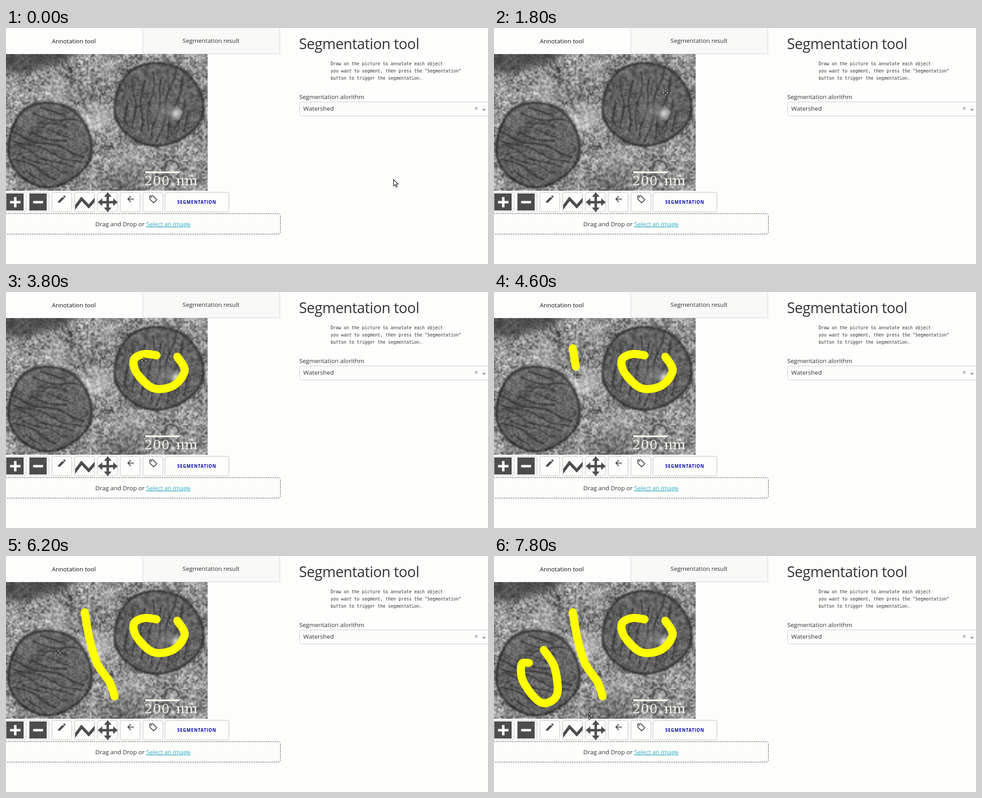
Animation of 1066 by 525 pixels, one loop 8000 ms. Source, as an HTML page with a canvas:

```html
<!DOCTYPE html>
<html lang="en">
<head>
<meta charset="utf-8">
<title>Segmentation tool</title>
<style>
html, body { margin: 0; width: 100%; height: 100%; overflow: hidden; background: #fdfdfb; }
canvas, svg { position: absolute; left: 0; top: 0; }
canvas { top: 58px; }
text { font: 13.4px "Open Sans", sans-serif; fill: #333; }
.mid { text-anchor: middle; }
.title { font-size: 32px; letter-spacing: -.5px; }
.mono text { font: 9.6px "DejaVu Sans Mono", monospace; }
.scale text { font: 30px "DejaVu Serif", serif; fill: #f4f4ea; }
.scale .digits { font-size: 28px; letter-spacing: 1px; }
.action { font-size: 9.8px; font-weight: 700; letter-spacing: .85px; fill: #0000c4; }
.link { fill: #2aa9c4; text-decoration: underline; }
.box { fill: none; stroke: #bbb; }
.icon { fill: #4d4d4d; }
.line { fill: none; stroke: #4d4d4d; stroke-width: 1.8; }
.ink { fill: none; stroke: #ff0; stroke-width: 18; stroke-linecap: round; stroke-linejoin: round; }
</style>
</head>
<body>
<canvas id="photo" width="446" height="304"></canvas>
<svg width="1066" height="525" viewBox="0 0 1066 525">
  <path d="M302 0H605.5V57.5H302Z" fill="#f8f8f7"/>
  <path d="M302.5 0V57.5H605.5V0" fill="none" stroke="#d3d3d3"/>
  <text class="mid" x="150" y="34" style="fill:#111">Annotation tool</text>
  <text class="mid" x="453.5" y="33">Segmentation result</text>

  <text class="title" x="648" y="47">Segmentation tool</text>
  <g class="mono">
    <text x="718" y="83">Draw on the picture to annotate each object</text>
    <text x="718" y="99">you want to segment, then press the "Segmentation"</text>
    <text x="718" y="115">button to trigger the segmentation.</text>
  </g>
  <text x="648.5" y="158">Segmentation alorithm</text>
  <rect x="649.5" y="164.5" width="430" height="31" rx="4" fill="none" stroke="#c6c6d8"/>
  <text x="657.5" y="184">Watershed</text>
  <path d="M1037 176l6 6m0-6l-6 6" stroke="#999" stroke-width="1.3"/>
  <path d="M1052.5 180h9l-4.5 4.5z" fill="#999"/>

  <g class="scale">
    <path d="M308 321H384" stroke="#f4f4ea" stroke-width="4"/>
    <text class="digits" x="306" y="350">200</text>
    <text x="376" y="350">nm</text>
  </g>

  <g id="buttons"></g>
  <rect class="box" x="351.5" y="365.5" width="141.5" height="43.5" rx="4"/>
  <text class="mid action" x="422" y="391">SEGMENTATION</text>
  <path class="icon" d="M1 368h38v38H1zM52 368h38v38H52z"/>
  <path d="M9 387.5h23M20.5 376v23M60 387.5h22" stroke="#fdfdfb" stroke-width="5.5"/>
  <path class="icon" transform="translate(112.5 369.8) scale(.92)" d="M3 17.2V21h3.8L17.8 9.9 14.1 6.2zM20.7 7c.4-.4.4-1 0-1.4l-2.3-2.3c-.4-.4-1-.4-1.4 0l-1.9 1.8 3.8 3.8z"/>
  <svg x="153" y="366" width="43" height="43"><path class="line" style="stroke-width:6.5" d="M-3 37L14 14 30 31 46 13"/></svg>
  <path class="line" style="stroke-width:5.5" d="M209 387.5H241M225 372V403"/>
  <g id="heads" class="icon"></g>
  <path class="line" d="M283 380.5H270M276 374l-6.5 6.5 6.5 6.5"/>
  <path class="line" stroke-linejoin="round" d="M318 373.5v7l8.5 8.5 7-7-8.5-8.5z"/>
  <circle class="icon" cx="321.3" cy="376.8" r="1.5"/>

  <rect x="-10.5" y="413" width="617.5" height="45.5" rx="5" fill="none" stroke="#333" stroke-dasharray="3 2"/>
  <text class="mid" x="302.7" y="441">Drag and Drop or <tspan class="link">Select an Image</tspan></text>

  <g id="strokes"></g>
  <path id="arrow" d="M0 0V14.5L3.4 11.4 5.8 17 8.2 16 5.8 10.5H10.3Z" fill="#fff" stroke="#111" stroke-width="1.2"/>
  <g id="cross">
    <path d="M-8 0H-1M1 0H8M0 -8V-1M0 1V8" stroke="#111" stroke-width="3.4"/>
    <path d="M-7 0H-2M2 0H7M0 -7V-2M0 2V7" stroke="#fff" stroke-width="1.3"/>
  </g>
</svg>
<script>
const $ = id => document.getElementById(id);
const LOOP = 8000, STEP = 200, LAG = 94;

// Catmull-Rom curve through a few key points
function curve(p) {
  const at = i => p[Math.max(0, Math.min(p.length - 1, i))];
  const handle = (i, sign) => [0, 1].map(k => at(i)[k] + sign * (at(i + 1)[k] - at(i - 1)[k]) / 6);
  return 'M' + p[0] + p.slice(1).map((q, i) => `C${handle(i, 1)} ${handle(i + 1, -1)} ${q}`).join('');
}

function svgNode(parent, tag, attrs) {
  const node = document.createElementNS('http://www.w3.org/2000/svg', tag);
  for (const k in attrs) node.setAttribute(k, attrs[k]);
  return parent.appendChild(node);
}

for (let i = 0; i < 7; i++)
  svgNode($('buttons'), 'rect', { class: 'box', x: 0.5 + i * 50.4, y: 365.5, width: 44, height: 43.5, rx: 4 });
for (let turn = 0; turn < 360; turn += 90)
  svgNode($('heads'), 'path', { d: 'M22 0L12 8.5V-8.5Z', transform: `translate(225 387.5) rotate(${turn})` });

// Grey mottled picture with two dark round bodies
function drawPhoto() {
  const c = $('photo').getContext('2d');
  let seed = 7;
  const rand = () => (seed = (seed * 16807) % 2147483647) / 2147483647;

  function mottle(size, low, high, alpha) {
    const tile = document.createElement('canvas');
    tile.width = Math.ceil(446 / size) + 1;
    tile.height = Math.ceil(304 / size) + 1;
    const t = tile.getContext('2d');
    for (let y = 0; y < tile.height; y++)
      for (let x = 0; x < tile.width; x++) {
        const v = Math.round(low + rand() * (high - low));
        t.fillStyle = `rgb(${v},${v},${v})`;
        t.fillRect(x, y, 1, 1);
      }
    c.globalAlpha = alpha;
    c.drawImage(tile, 0, 0, tile.width * size, tile.height * size);
    c.globalAlpha = 1;
  }
  function glow(x, y, r, grey, alpha) {
    const g = c.createRadialGradient(x, y, 0, x, y, r);
    g.addColorStop(0, `rgba(${grey},${grey},${grey},${alpha})`);
    g.addColorStop(1, `rgba(${grey},${grey},${grey},0)`);
    c.fillStyle = g;
    c.fillRect(x - r, y - r, 2 * r, 2 * r);
  }
  function line(path, width, alpha) {
    c.lineWidth = width;
    c.strokeStyle = `rgba(30,30,30,${alpha})`;
    c.stroke(path);
  }

  // Wobbly ellipse with wavy folds that fan out around the given angle
  function body(cx, cy, rx, ry, angle, fan, folds) {
    const outline = new Path2D();
    for (let a = 0; a < 2 * Math.PI; a += 0.05) {
      const r = 1 + 0.02 * Math.sin(3 * a + 1) + 0.012 * Math.sin(5 * a);
      outline.lineTo(cx + rx * r * Math.cos(a), cy + ry * r * Math.sin(a));
    }
    outline.closePath();
    c.fillStyle = 'rgba(72,72,72,.58)';
    c.fill(outline);
    line(outline, 9, .25);
    line(outline, 3.5, .55);

    for (let k = 0; k < folds; k++) {
      const side = (k + .5) / folds * 2 - 1;
      const a = angle + fan * side;
      const half = Math.sqrt(1 - side * side) * rx * (.45 + .45 * rand());
      const shift = (rand() - .5) * rx * .3;
      const fold = new Path2D();
      for (let s = -half; s <= half; s += 3) {
        const along = s + shift * (1 - half / rx);
        const across = side * ry * .88 + 4 * Math.sin(s / 17 + k * 2);
        fold.lineTo(cx + along * Math.cos(a) - across * Math.sin(a),
          cy + along * Math.sin(a) + across * Math.cos(a));
      }
      line(fold, 2.5 + 2 * rand(), .5);
    }
  }

  mottle(20, 80, 230, 1);
  mottle(7, 20, 270, .5);
  mottle(3.5, 10, 250, .45);
  c.translate(0, -58);
  glow(205, 200, 50, 225, .55);
  glow(115, 145, 45, 215, .45);
  glow(225, 85, 45, 210, .35);
  glow(280, 285, 55, 210, .35);
  glow(255, 350, 60, 60, .45);
  c.filter = 'blur(6px)';
  c.fillStyle = 'rgba(55,55,55,.68)';
  c.fill(new Path2D('M-9 48H170Q100 100 -9 104Z'));
  c.filter = 'blur(.9px)';
  c.lineCap = c.lineJoin = 'round';
  body(337, 170, 98, 92, -1.4, .25, 9);
  body(96, 260, 92, 94, .3, .2, 11);
  glow(376, 190, 17, 235, .9);
  glow(350, 185, 32, 160, .5);
  glow(367, 310, 15, 215, .7);
  line(new Path2D('M352 315C348 288 380 288 382 312'), 3, .5);
  c.filter = 'none';
}
drawPhoto();

// Pointer route; the pointer rests between legs
const legs = [
  { from: 0, to: 1080, points: [[857, 337], [401, 171], [379, 144]] },
  { from: 1800, to: 3660, inked: true, points: [[379, 144], [395, 175], [371, 208], [326, 214],
    [289, 180], [283, 150], [306, 138], [333, 141]] },
  { from: 3660, to: 3800, points: [[333, 141], [305, 153]] },
  { from: 3800, to: 4300, points: [[305, 153], [174, 125]] },
  { from: 4300, to: 5300, inked: true, points: [[174, 125], [185, 185], [202, 240], [229, 280], [240, 312]] },
  { from: 5400, to: 6160, points: [[240, 312], [110, 209]] },
  { from: 6160, to: 7500, inked: true, points: [[110, 209], [134, 248], [139, 309], [104, 326],
    [65, 280], [61, 241], [77, 238]] },
  { from: 7500, to: 7800, points: [[77, 238], [211, 356]] }
];
for (const leg of legs) {
  leg.path = svgNode($('strokes'), 'path', { d: curve(leg.points), class: 'ink', visibility: 'hidden' });
  leg.length = leg.path.getTotalLength();
}
const progress = (leg, t) => Math.max(0, Math.min(1, (t - leg.from) / (leg.to - leg.from)));

function draw(now) {
  const t = Math.floor(now % LOOP / STEP) * STEP;
  for (const leg of legs.filter(l => l.inked)) {
    const p = progress(leg, t - LAG);
    leg.path.setAttribute('visibility', p > 0 ? 'visible' : 'hidden');
    leg.path.setAttribute('stroke-dasharray', p < 1 ? `${p * leg.length} 9999` : 'none');
  }
  const leg = legs.filter(l => l.from <= t).pop();
  const { x, y } = leg.path.getPointAtLength(progress(leg, t) * leg.length);
  const overPhoto = x < 446 && y > 58 && y < 362;
  for (const [id, shown] of [['cross', overPhoto], ['arrow', !overPhoto]]) {
    $(id).setAttribute('visibility', shown ? 'visible' : 'hidden');
    $(id).setAttribute('transform', `translate(${x} ${y})`);
  }
  requestAnimationFrame(draw);
}
draw(0);
</script>
</body>
</html>
```
